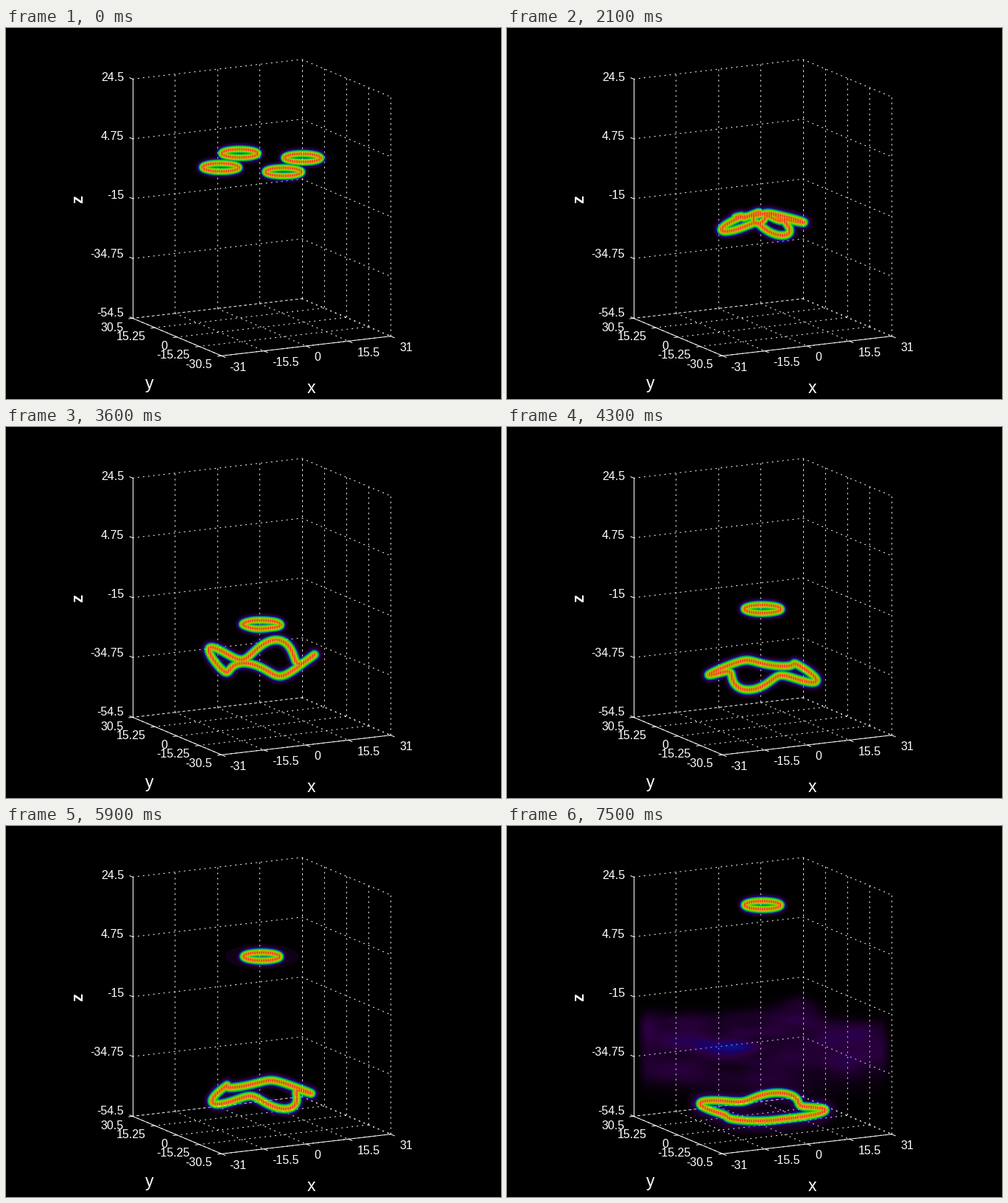
Animation of 672 by 504 pixels, one loop 7.6 s. Source, as a matplotlib script:

```python
import numpy as np
import matplotlib.pyplot as plt
from matplotlib.animation import FuncAnimation

W, H = 672, 504
FRAMES, STEP = 76, 100
MERGE = 2.1  # seconds, when the four rings reconnect
PX = 0.75    # points per pixel at 96 dpi

X_TICKS = [-31, -15.5, 0, 15.5, 31]
Y_TICKS = [30.5, 15.25, 0, -15.25, -30.5]
Z_TICKS = [24.5, 4.75, -15, -34.75, -54.5]
X0, X1, Y0, Y1, Z0, Z1 = -31, 31, -30.5, 30.5, -54.5, 24.5

plt.rcParams["font.family"] = "Liberation Sans"


def project(x, y, z):
    px = 347.1 + 3.703 * x - 1.979 * y
    py = 406.5 - 0.43 * x - 0.836 * y - 4.114 * (z - Z0)
    return px, py


def track(t, times, values):
    """Cubic Hermite curve through a few keys."""
    m = np.gradient(values, times)
    i = int(np.clip(np.searchsorted(times, t) - 1, 0, len(times) - 2))
    h = times[i + 1] - times[i]
    s = (t - times[i]) / h
    return ((2 * s**3 - 3 * s**2 + 1) * values[i]
            + (s**3 - 2 * s**2 + s) * h * m[i]
            + (3 * s**2 - 2 * s**3) * values[i + 1]
            + (s**3 - s**2) * h * m[i + 1])


def pulse(t, mid, half):
    return max(0.0, 1 - abs(t - mid) / half)


# ---- vortex curves ----
def four_rings(t):
    psi = np.linspace(0, 2 * np.pi, 130, endpoint=False)
    dist = 15 - 0.9 * (t / 1.2) ** 3.4
    tilt = 0.11 * (t / 1.2) ** 2
    z = -0.15 - 8.6 * t - 0.2 * t**2 - 5.85 * np.cos(psi) * np.sin(tilt)
    rad = dist + 5.85 * np.cos(psi) * np.cos(tilt)
    tan = 5.85 * np.sin(psi)
    curves = []
    for k in range(4):
        c, s = np.cos(k * np.pi / 2), np.sin(k * np.pi / 2)
        curves.append(project(rad * c - tan * s, rad * s + tan * c, z))
    return curves


def wavy_loop(n, r, r_amp, z, z_amp):
    a = np.linspace(0, 2 * np.pi, n, endpoint=False)
    wave = np.cos(4 * a)
    rad = r + r_amp * wave
    return project(rad * np.cos(a), rad * np.sin(a), z + z_amp * wave)


KEYS = [MERGE, 2.9, 4.3, 5.9, 6.7, 7.5]
RADIUS = [10.9, 14.7, 15.1, 14.7, 16.0, 17.5]
SWING = [4.0, 3.6, 3.3, 3.2, 3.3, 3.4]
PHASE = [-20, -60, -210, -390, -464, -530]
DEPTH = [-19.8, -27.2, -36.9, -43.9, -46.75, -49.0]
CORE_KEYS = [MERGE, 2.5, 2.9, 3.3, 3.8, 4.3, 5.9, 6.7, 7.5]
CORE_Z = [-18.0, -20.6, -22.1, -22.1, -19.7, -15.8, 1.2, 10.4, 18.2]
CORE_R = [4.7, 5.9, 6.4, 6.2, 6.0, 5.9, 5.85, 5.8, 5.8]


def two_loops(t):
    swing = track(t, KEYS, SWING)
    phase = np.radians(track(t, KEYS, PHASE))
    outer = wavy_loop(420, track(t, KEYS, RADIUS), swing * np.cos(phase),
                      track(t, KEYS, DEPTH), swing * np.sin(phase))
    fade = np.exp(-(t - MERGE) / 0.55)
    inner = wavy_loop(130, track(t, CORE_KEYS, CORE_R), -1.7 * fade,
                      track(t, CORE_KEYS, CORE_Z), 0.9 * fade)
    return [outer, inner]


# ---- density field ----
GX, GY = np.meshgrid(np.arange(W) + 0.5, np.arange(H) + 0.5)
STRIPES = (np.arange(W) % 3 == 0)[None, :]
REACH = 26


def distance2(px, py):
    field = np.full((H, W), 1e4)
    for x, y in zip(px, py):
        c, r = int(x), int(y)
        box = (slice(max(r - REACH, 0), r + REACH),
               slice(max(c - REACH, 0), c + REACH))
        dx = GX[0, box[1]] - x
        dy = GY[box[0], 0] - y
        np.minimum(field[box], dx[None, :]**2 + dy[:, None]**2, out=field[box])
    return field


def tube(d2, width):
    return np.exp(-d2 / (2 * width**2))


def blob(x, y, sx, sy):
    return np.exp(-((GX - x) / sx) ** 2 / 2 - ((GY - y) / sy) ** 2 / 2)


def make_haze():
    rng = np.random.default_rng(11)
    noise = np.zeros((H, W))
    for _ in range(120):
        noise += rng.choice([-1, 1]) * blob(
            rng.uniform(180, 520), rng.uniform(235, 360),
            rng.uniform(10, 36), rng.uniform(5, 11))
    top = np.interp(GX, [178, 290, 350, 400, 440, 520],
                    [254, 260, 250, 234, 260, 272])
    env = 1 / (1 + np.exp((top - GY) / 5)) / (1 + np.exp((GY - 342) / 9))
    sides = np.clip((GX - 176) / 14, 0, 1) * np.clip((522 - GX) / 14, 0, 1)
    cloud = env * sides * np.clip(0.105 + 0.03 * noise, 0, 0.19)
    cloud += 0.07 * blob(305, 298, 26, 7) + 0.04 * blob(408, 266, 16, 7)
    return cloud + 0.06 * blob(350, 350, 70, 16)


def make_corners():
    spots = np.zeros((H, W))
    for x in (X0, X1):
        for y in (Y0, Y1):
            cx, cy = project(x, y, -6.0)
            spots = np.maximum(spots, (np.hypot(GX - cx, GY - cy) < 15) * 1.0)
    return spots * ((GX > 173) & (GX < 522))


HAZE = make_haze()
CORNERS = make_corners()

LEVELS = [0, 0.06, 0.15, 0.22, 0.30, 0.38, 0.48, 0.62, 0.77, 0.87, 0.94, 1]
COLORS = np.array([
    (0, 0, 0), (22, 0, 32), (44, 0, 66), (28, 0, 110), (0, 40, 150),
    (0, 120, 135), (0, 185, 75), (65, 215, 0), (160, 210, 0),
    (225, 155, 10), (240, 100, 25), (236, 70, 40)]) / 255


def colorize(v):
    rgba = np.empty((H, W, 4))
    for k in range(3):
        rgba[..., k] = np.interp(v, LEVELS, COLORS[:, k])
    # dim parts let the grid shine through
    alpha = rgba[..., :3].max(axis=2)
    rgba[..., :3] /= np.maximum(alpha, 1e-6)[..., None]
    rgba[..., 3] = alpha
    return rgba


def density(t):
    if t < MERGE:
        d2 = np.minimum.reduce([distance2(*c) for c in four_rings(t)])
        v = tube(d2, 3.7 + 0.3 * t)
    else:
        outer, inner = two_loops(t)
        d2 = distance2(*outer)
        v = np.maximum(tube(d2, 4.4), tube(distance2(*inner), 3.9))
    v -= 0.13 * STRIPES * (v > 0.86)
    if t > 5.5:
        glow = tube(d2, 9) * (d2 < 24**2)
        v = np.maximum(v, 0.2 * np.clip((t - 6.3) / 1.2, 0, 1) * glow)
        disc = ((GX - 347.5) / 50) ** 2 + ((GY - inner[1].mean()) / 17) ** 2
        v = np.maximum(v, 0.045 * pulse(t, 5.9, 0.35) * (disc < 1))
        v = np.maximum(v, 0.045 * pulse(t, 6.7, 0.35) * CORNERS)
    rise = np.clip((t - 6.75) / 0.75, 0, 1) ** 1.5
    return np.maximum(v, rise * HAZE)


# ---- static scene ----
fig = plt.figure(figsize=(W / 96, H / 96), dpi=96, facecolor="black")
ax = fig.add_axes([0, 0, 1, 1])
ax.set_xlim(0, W)
ax.set_ylim(H, 0)
ax.axis("off")


def line(a, b, dotted=True):
    (xa, ya), (xb, yb) = project(*a), project(*b)
    ax.plot([xa, xb], [ya, yb], color="white", lw=PX, zorder=1,
            ls=(0, (2, 5)) if dotted else "-", dash_capstyle="butt")


def label(x, y, s, ha, size=16, **kw):
    ax.text(x, y, s, color="white", ha=ha, va="center_baseline",
            fontsize=size * PX, zorder=3, **kw)


for i, x in enumerate(X_TICKS):
    line((x, Y1, Z1), (x, Y1, Z0))
    line((x, Y1, Z0), (x, Y0, Z0))
    line((x, Y0, Z0), (x, Y0 - 2.5, Z0), False)
    label(303 + 57.9 * i, 460 - 6.8 * i, f"{x:g}", "left")
for i, y in enumerate(Y_TICKS):
    line((X1, y, Z1), (X1, y, Z0))
    line((X1, y, Z0), (X0, y, Z0))
    line((X0, y, Z0), (X0 - 1.4, y, Z0), False)
    label(159.5 + 30 * i, 405.5 + 12.6 * i, f"{y:g}", "right")
for i, z in enumerate(Z_TICKS):
    line((X0, Y1, z), (X1, Y1, z))
    line((X1, Y1, z), (X1, Y0, z))
    line((X0, Y1, z), (X0, Y1 + 2, z), False)
    label(160, 65.5 + 80.1 * i, f"{z:g}", "right")

line((X0, Y1, Z1), (X0, Y1, Z0), False)
line((X0, Y1, Z0), (X0, Y0, Z0), False)
line((X0, Y0, Z0), (X1, Y0, Z0), False)

label(195, 481, "y", "center", 23)
label(414, 487, "x", "center", 23)
ax.text(98.5, 232, "z", color="white", ha="center", va="center",
        fontsize=22 * PX, rotation=90, weight="bold", zorder=3)

volume = ax.imshow(np.zeros((H, W, 4)), extent=(0, W, H, 0), zorder=2,
                   interpolation="nearest", aspect="auto")


def update(n):
    volume.set_data(colorize(density(n * STEP / 1000)))
    return [volume]


anim = FuncAnimation(fig, update, frames=FRAMES, interval=STEP,
                     repeat=True, repeat_delay=0)
plt.show()
```
